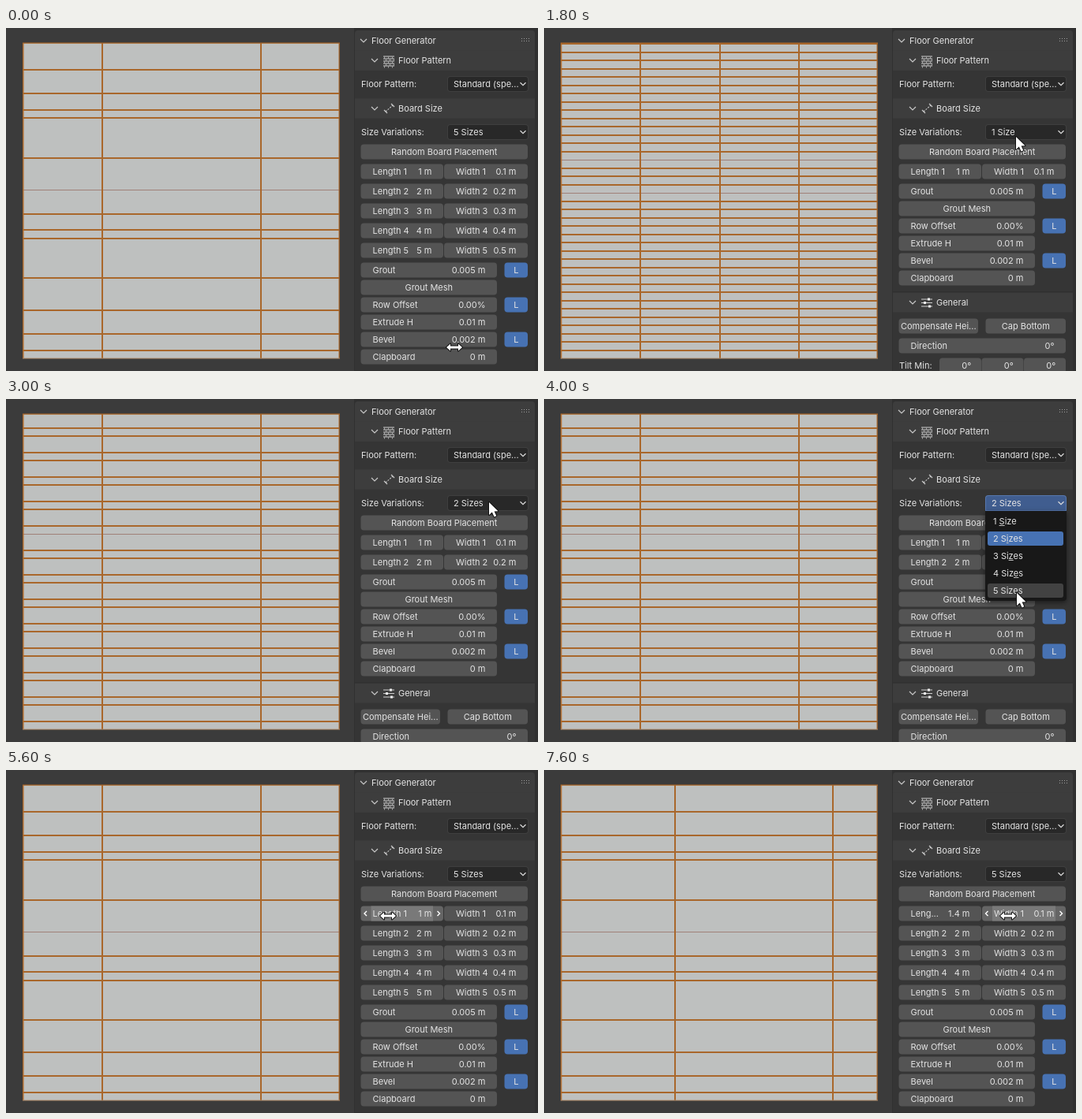
Recreate the animation shown at these times as an HTML page with a canvas. Size 674 px wide and 435 px high, loop 8000 ms.

```html
<!DOCTYPE html>
<html lang="en">
<head>
<meta charset="utf-8">
<title>Floor Generator</title>
<style>
html, body { margin: 0; width: 100%; height: 100%; overflow: hidden; background: #3b3b3b; }
canvas { display: block; }
</style>
</head>
<body>
<canvas id="stage" width="674" height="435"></canvas>
<script>
const g = document.getElementById('stage').getContext('2d');
const LOOP = 8000, FIELD = '#545454', BLUE = '#4772b3', TEXT = '#e4e4e4';

// time, pointer x, y, pointer kind, sizes, menu open, hovered field
const steps = [
  [0, 568, 405, 'drag', 5],
  [200, 602, 260, 'drag', 5, 0, 'W4'],
  [400, 604, 133, 'arrow', 5],
  [1000, 604, 133, 'arrow', 5, 1],
  [1200, 602, 142, 'arrow', 5, 1],
  [1400, 598, 152, 'arrow', 5, 1],
  [1600, 598, 146, 'arrow', 1],
  [1800, 598, 138, 'arrow', 1],
  [2200, 598, 138, 'arrow', 1, 1],
  [2400, 599, 156, 'arrow', 1, 1],
  [2600, 602, 172, 'arrow', 1, 1],
  [2800, 608, 150, 'arrow', 2],
  [3000, 612, 131, 'arrow', 2],
  [3400, 612, 131, 'arrow', 2, 1],
  [3600, 610, 160, 'arrow', 2, 1],
  [3800, 603, 215, 'arrow', 2, 1],
  [4000, 599, 246, 'arrow', 2, 1],
  [4600, 599, 246, 'arrow', 5],
  [4800, 588, 234, 'drag', 5, 0, 'W3'],
  [5000, 545, 214, 'drag', 5, 0, 'L2'],
  [5200, 510, 203, 'drag', 5, 0, 'L2'],
  [5400, 490, 188, 'drag', 5, 0, 'L1'],
  [5600, 484, 185, 'drag', 5, 0, 'L1'],
  [5800, 484, 185, 'none', 5, 0, 'L1'],
  [6800, 484, 185, 'drag', 5, 0, 'L1'],
  [7000, 500, 185, 'drag', 5, 0, 'L1'],
  [7200, 535, 185, 'drag', 5, 0, 'L1'],
  [7400, 570, 185, 'drag', 5, 0, 'W1'],
  [7600, 588, 185, 'drag', 5, 0, 'W1']
];

function rect(x, y, w, h, color) {
  g.fillStyle = color;
  g.fillRect(x, y, w, h);
}

function box(x0, x1, cy, h, color, radii = 4) {
  g.fillStyle = color;
  g.beginPath();
  g.roundRect(x0, cy - h / 2, x1 - x0, h, radii);
  g.fill();
}

function text(s, x, cy, align = 'left', color = TEXT) {
  g.fillStyle = color;
  g.textAlign = align;
  g.fillText(s, x, cy + 4);
}

function line(points, color = '#c8c8c8', width = 1.2) {
  g.strokeStyle = color;
  g.lineWidth = width;
  g.beginPath();
  points.forEach(([x, y]) => g.lineTo(x, y));
  g.stroke();
}

const down = (x, y, r = 4, color) => line([[x - r, y - r / 2], [x, y + r / 2], [x + r, y - r / 2]], color);
const side = (x, y, d) => line([[x - d * 1.5, y - 3], [x + d * 1.5, y], [x - d * 1.5, y + 3]], '#fff', 1.4);

function drawFloor(sizes, len) {
  const orange = '#a9672b', left = 22, top = 19, right = 422, bottom = 419;
  const thin = { 1: [20, 24], 2: [16], 5: [8] }[sizes];
  rect(left, top, right - left, bottom - top, '#bec0bf');
  for (let k = 1, y = bottom + .3; ; k++) {
    y -= ((k - 1) % sizes + 1) * 10 + .5;
    if (y < top) break;
    if (thin.includes(k)) rect(left, Math.round(y), 400, 1, '#a08078');
    else rect(left, Math.round(y) - 1, 400, 2, orange);
  }
  for (let k = 0, x = left; ; k++) {
    const size = k % sizes;
    x += (size ? size + 1 : len) * 100 + .5;
    if (x > right) break;
    rect(Math.round(x - .3) - 1, top, 2, 400, orange);
  }
  rect(left - 1, top, 1.5, 400, orange);
  rect(right - .5, top, 1.2, 400, orange);
  rect(left - 1, top - .5, 402, 1.3, orange);
  rect(left - 1, bottom - .5, 402, 1, '#ad8a68');
}

function number(x0, x1, y, label, value, hot, held) {
  box(x0, x1, y, 19, held ? '#222' : hot ? '#656565' : FIELD);
  if (hot && !held) {
    rect(x0 + 13, y - 9.5, x1 - x0 - 26, 19, '#797979');
    side(x0 + 6, y, -1);
    side(x1 - 6, y, 1);
  }
  text(label, x0 + 15, y);
  text(value, x1 - 14.5, y, 'right');
}

function button(x0, x1, y, label, color = FIELD) {
  box(x0, x1, y, 19, color);
  text(label, (x0 + x1) / 2, y, 'center');
}

function dropdown(y, label, value, open) {
  text(label, 450, y);
  box(559, 662, y, 20, open ? '#5677ad' : '#3f3f3f', open ? [4, 4, 0, 0] : 4);
  box(560, 661, y, 18, open ? '#405d8f' : '#282828', open ? [3, 3, 0, 0] : 3);
  text(value, 567, y);
  down(655, y, 3.5, '#ddd');
}

function header(y, label, icon) {
  rect(442, y - 12.5, 228, 25, '#3d3d3d');
  down(467, y);
  icon(y);
  text(label, 497, y);
}

function bricks(y) {
  for (let i = 0; i < 5; i++) {
    const ly = y - 5.5 + i * 3;
    rect(478, ly, 14, 1, '#cfcfcf');
    for (let j = 0; j < 3; j++) rect(479 + j * 5 + (i % 2) * 2, ly + 1, 1, 2, '#aaa');
  }
}

function ruler(y) {
  g.setLineDash([2, 1.5]);
  line([[481, y + 4], [490, y - 4]]);
  g.setLineDash([]);
  line([[479, y + 2], [483, y + 6]]);
  line([[488, y - 6], [492, y - 2]]);
}

function sliders(y) {
  [8, 3, 9].forEach((knob, i) => {
    const ly = y - 4.5 + i * 4.5;
    rect(478, ly, 14, 1, '#cfcfcf');
    rect(478 + knob, ly - 1, 3, 3, '#eee');
  });
}

function drawPanel(sizes, open, hot, held, len) {
  rect(441, 0, 233, 435, '#303030');
  g.fillStyle = '#3d3d3d';
  g.beginPath();
  g.roundRect(442, 3, 228, 440, 4);
  g.fill();
  rect(442, 54, 228, 35.5, '#353535');
  rect(442, 114.5, 228, 321, '#353535');

  down(453, 16);
  text('Floor Generator', 463, 16);
  for (let i = 0; i < 8; i++) rect(653 + (i % 4) * 3, 13 + (i >> 2) * 3, 1, 1, '#a0a0a0');

  header(41, 'Floor Pattern', bricks);
  dropdown(71, 'Floor Pattern:', 'Standard (spe...');
  header(102, 'Board Size', ruler);
  dropdown(132, 'Size Variations:', sizes + (sizes > 1 ? ' Sizes' : ' Size'), open);
  button(449.5, 661, 157, 'Random Board Placement');

  for (let i = 1; i <= sizes; i++) {
    const y = 157 + i * 25, changed = i === 1 && len > 1;
    number(449.5, 554, y, changed ? 'Leng...' : 'Length ' + i,
      (changed ? len.toFixed(1) : i) + ' m', hot === 'L' + i, held && i === 1);
    number(555, 661, y, 'Width ' + i, `0.${i} m`, hot === 'W' + i);
  }

  const y = 182 + sizes * 25;
  number(449.5, 622, y, 'Grout', '0.005 m');
  button(449.5, 622, y + 22, 'Grout Mesh');
  number(449.5, 622, y + 44, 'Row Offset', '0.00%');
  number(449.5, 622, y + 66, 'Extrude H', '0.01 m');
  number(449.5, 622, y + 88, 'Bevel', '0.002 m');
  number(449.5, 622, y + 110, 'Clapboard', '0 m');
  for (const dy of [0, 44, 88]) button(631.5, 661, y + dy, 'L', BLUE);

  rect(442, y + 127, 228, 2, '#303030');
  header(y + 141, 'General', sliders);
  button(449.5, 550, y + 171, 'Compensate Hei...');
  button(559.5, 661, y + 171, 'Cap Bottom');
  number(449.5, 661, y + 196, 'Direction', '0°');
  text('Tilt Min:', 450, y + 221);
  for (let i = 0; i < 3; i++) button(501 + i * 53.5, 554 + i * 53.5, y + 221, '     0°');
}

function drawMenu(sizes, py) {
  g.save();
  g.shadowColor = 'rgba(0,0,0,.5)';
  g.shadowBlur = 6;
  g.shadowOffsetY = 2;
  box(559, 662, 199, 114, '#181818', [0, 0, 4, 4]);
  g.restore();
  const over = Math.floor((py - 144) / 22) + 1;
  for (let i = 1; i <= 5; i++) {
    const y = 133 + i * 22, label = i + (i > 1 ? ' Sizes' : ' Size');
    if (i === sizes) box(562, 658, y, 18, BLUE, 3);
    else if (i === over) box(562, 658, y, 18, '#424242', 3);
    text(label, 569, y);
    if (i < 5) { // shortcut letter
      const x = 569 + g.measureText(label.slice(0, i + 1)).width;
      rect(x, y + 5, g.measureText(label[i + 1]).width, 1, '#c0c0c0');
    }
  }
}

const arrowShape = [[0, 0], [0, 16], [3.8, 12.6], [6.6, 18.5], [9.3, 17.2], [6.6, 11.5], [11.5, 11.2]];
const dragShape = [[-10, 0], [-5, -4.5], [-5, -1.5], [5, -1.5], [5, -4.5],
  [10, 0], [5, 4.5], [5, 1.5], [-5, 1.5], [-5, 4.5]];

function drawPointer(x, y, kind) {
  if (kind === 'none') return;
  g.save();
  g.translate(x, y);
  g.beginPath();
  (kind === 'arrow' ? arrowShape : dragShape).forEach(p => g.lineTo(...p));
  g.closePath();
  g.lineJoin = 'round';
  g.lineWidth = 2;
  g.strokeStyle = '#111';
  g.stroke();
  g.fillStyle = '#fff';
  g.fill();
  g.restore();
}

function draw(now) {
  const t = Math.floor(now % LOOP / 200) * 200;
  const [, x, y, kind, sizes, open, hot] = steps.findLast(s => s[0] <= t);
  const len = 1 + .435 * Math.min(1, Math.max(0, (t - 5600) / 1200));
  g.font = '11px Inter, sans-serif';
  rect(0, 0, 674, 435, '#3b3b3b');
  drawFloor(sizes, len);
  drawPanel(sizes, open, hot, kind === 'none', len);
  if (open) drawMenu(sizes, y);
  drawPointer(x, y, kind);
}

const start = performance.now();
function tick() {
  draw(performance.now() - start);
  requestAnimationFrame(tick);
}
tick();
</script>
</body>
</html>
```
